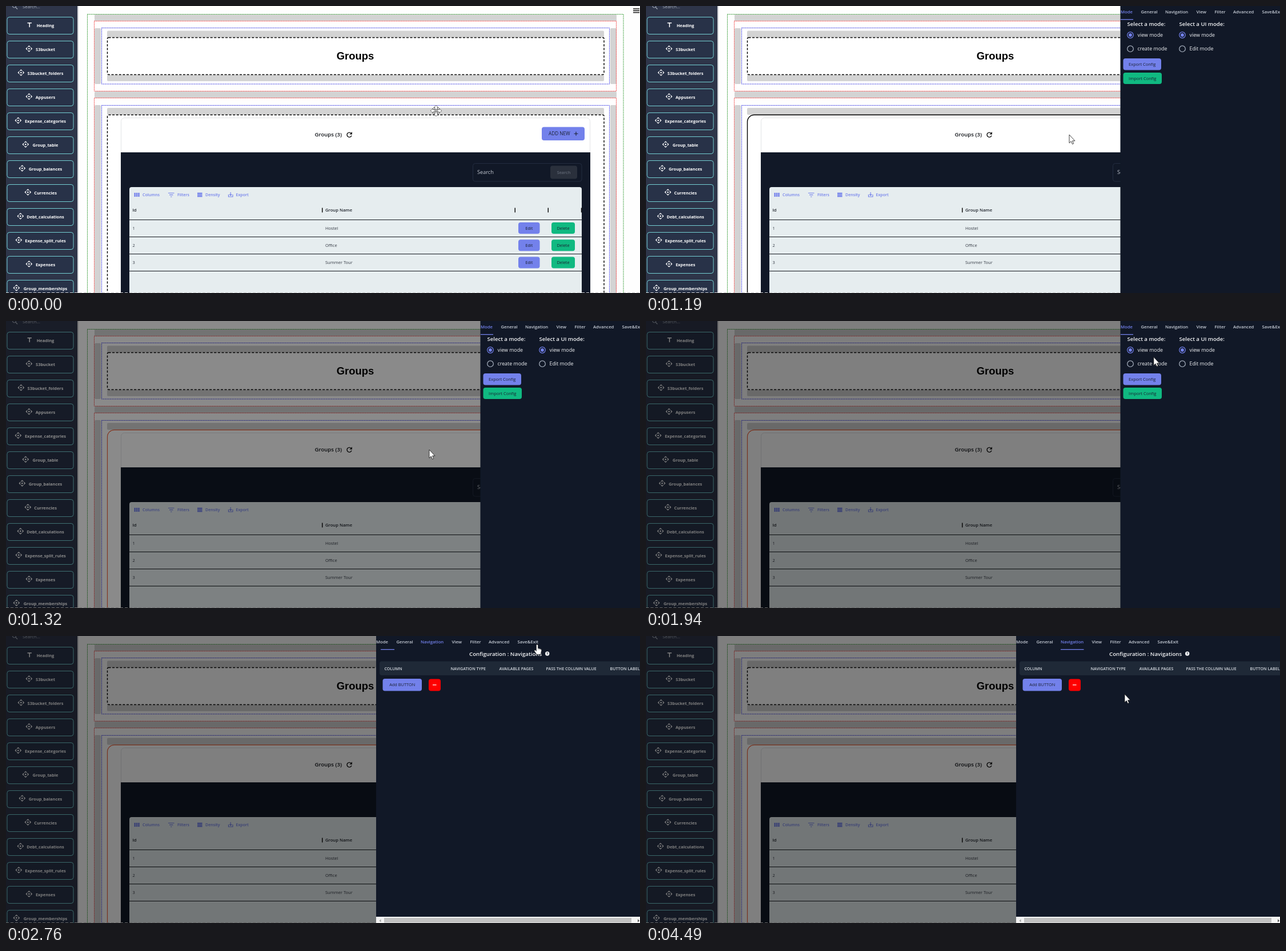
Animation, 1110 px wide and 504 px high, one loop 4.82 s. Source, as an HTML page:

```html
<!DOCTYPE html>
<html lang="en">
<head>
<meta charset="utf-8">
<title>Page builder</title>
<style>
  html, body { margin: 0; width: 100%; height: 100%; overflow: hidden; background: #fff; }
  svg { display: block; width: 1110px; height: 504px; }
  text { font-family: "Open Sans", "Noto Sans", sans-serif; white-space: pre; }
</style>
</head>
<body>
<svg id="stage" viewBox="0 0 1110 504" xmlns="http://www.w3.org/2000/svg"></svg>
<script>
const LOOP = 4820;
const INDIGO = '#7381eb', GREEN = '#10b981', NAVY = '#111827', GREY = '#d3d3d3';
const DOTS = '2 1', DASHES = '4 2.6';

// Drawing helpers
const box = (x, y, w, h, fill, r = 0, extra = '') =>
  `<rect x="${x}" y="${y}" width="${w}" height="${h}" rx="${r}" fill="${fill}" ${extra}/>`;
const outline = (x, y, w, h, color, dash = 'none', r = 0) =>
  box(x, y, w, h, 'none', r, `stroke="${color}" stroke-dasharray="${dash}"`);
const path = (d, color, width = 1, extra = '') =>
  `<path d="${d}" fill="none" stroke="${color}" stroke-width="${width}" ${extra}/>`;
const esc = s => s.replace('&', '&amp;');
const label = (x, cy, s, size, color, weight = 400, anchor = 'start') =>
  `<text x="${x}" y="${(cy + size * .36).toFixed(2)}" font-size="${size}" fill="${color}"
    font-weight="${weight}" text-anchor="${anchor}">${esc(s)}</text>`;
const button = (x, y, w, h, s, size, fill, color = '#1b2233', weight = 400) =>
  box(x, y, w, h, fill, 4) + label(x + w / 2, y + h / 2, s, size, color, weight, 'middle');
const group = (id, body, extra = '') => `<g id="${id}" ${extra}>${body}</g>`;
const four = d => [0, 90, 180, 270].map(a => `<path d="${d}" transform="rotate(${a})"/>`).join('');

function sidebar() {
  const items = [
    ['Heading', 41], ['S3bucket', 40], ['S3bucket_folders', 26], ['Appusers', 40],
    ['Expense_categories', 21], ['Group_table', 34], ['Group_balances', 28], ['Currencies', 38],
    ['Debt_calculations', 25], ['Expense_split_rules', 22], ['Expenses', 40], ['Group_memberships', 18]
  ];
  const rows = items.map(([name, ix], i) => {
    const y = 34 + i * 42;
    const icon = i
      ? `<g transform="translate(${ix + .3} ${y - 1})" fill="none" stroke="#fff" stroke-width="1.2">
          ${four('M-2-3L0-5L2-3')}<circle r="1.3" fill="#fff" stroke="none"/></g>`
      : path(`M37.5 ${y - 4.2}h7.4M41.2 ${y - 4.2}v7.4`, '#fff', 1.5);
    return box(2, y - 14.5, 116, 30, '#283248', 4, 'stroke="#74cfd3"') + icon +
      label(69, y, name, 7.45, '#fff', 700, 'middle');
  });
  return box(0, 0, 125, 504, '#2e3549') + box(125, 0, 2, 504, '#d0d2d6') +
    `<circle cx="14.5" cy="0" r="3" fill="none" stroke="#aab1bd"/>` + path('M16.7 2.2L20 5.5', '#aab1bd', 1.2) +
    label(29, 1, 'Search...', 7.8, '#aab1bd') + rows.join('');
}

function frames() {
  const red = '#f24848', blue = '#4545e4';
  const side = (y, h) => box(155, y, 11, h, GREY, 2) + box(1058, y, 11, h, GREY, 2);
  const bar = (y, h) => box(177, y, 870, h, GREY, 2);
  return outline(142.5, 14.5, 938.5, 520, '#3a9d3a', DOTS) +
    box(155, 15, 914, 11, GREY) + box(155, 150, 914, 11.5, GREY, 2) +
    side(39, 98) + side(174, 340) +
    outline(154.5, 26.5, 914, 123, red, DOTS) +
    outline(154.5, 161.5, 914, 400, red, DOTS) +
    outline(167.5, 38.5, 889, 98.5, blue, DOTS) +
    outline(167.5, 174.5, 889, 400, blue, DOTS) +
    bar(43.5, 12) + bar(121, 11) + bar(179, 12) +
    box(177.5, 55.5, 869.5, 65, '#fff', 2, `stroke="#000" stroke-width="1.4" stroke-dasharray="${DASHES}"`) +
    `<text x="611.5" y="93.5" font-size="18.4" font-weight="700" text-anchor="middle"
      style="font-family:'Liberation Sans',Arial,sans-serif">Groups</text>` +
    `<rect id="active" x="177.5" y="191.3" width="869.5" height="400" fill="#fff"/>`;
}

function tools() {
  const bars = [0, 3.4, 6.8];
  return bars.map(d => box(224.5 + d, 328, 2.4, 7, INDIGO)).join('') +
    path('M284 328.5h10.5M286 331.7h6.5M288 335h2.5', INDIGO, 1.2) +
    bars.map(d => box(335, 327.8 + d * .8, 8.6, 2.1, INDIGO)).join('') +
    path('M389.5 331v4h7.5v-4M393.2 327v5.5M391 330.6l2.2 2.2l2.2-2.2', INDIGO, 1.1) +
    [['Columns', 239], ['Filters', 300], ['Density', 349], ['Export', 402.5]]
      .map(([s, x]) => label(x, 331.5, s, 7.05, INDIGO, 600)).join('');
}

function card() {
  const rows = ['Hostel', 'Office', 'Summer Tour'].map((name, i) => {
    const y = 390 + i * 30.2;
    return label(221.5, y, String(i + 1), 7.5, '#353b45') + label(559, y, name, 7.5, '#353b45') +
      button(897, y - 10, 37.5, 20, 'Edit', 7.45, INDIGO) +
      button(955, y - 10, 41, 20, 'Delete', 7.35, GREEN);
  });
  const lines = [0, 1, 2, 3].map(i => box(216, 375 + i * 30, 792, 1, '#15191f')).join('');
  const seps = [553, 890.5, 948.5, 1006.8].map(x => box(x, 354.5, 1.5, 8, '#111')).join('');
  return box(201.5, 196.5, 821, 330, '#fff', 6, 'stroke="#e3e4e6"') +
    box(201, 257, 822, 247, NAVY) +
    label(540.5, 225.5, 'Groups (3)', 9.6, '#14171c', 600) +
    path('M604.3 223.6A4.1 4.1 0 1 0 605 227.6', '#111', 1.4) +
    '<path d="M606 221v4.6h-4.6z" fill="#111"/>' +
    box(938, 212.5, 75, 23.5, INDIGO, 4) + label(950, 224.3, 'ADD NEW', 8.2, '#1b2233', 500) +
    path('M994.5 224.3h7M998 220.8v7', '#1b2233', 1.1) +
    outline(817.5, 276.5, 190.5, 31.5, '#232c3f', 'none', 4) +
    label(825, 292, 'Search', 9.2, '#c4c9d2') +
    button(953, 280.5, 47, 23, 'Search', 7.3, '#2a303c', '#616875', 600) +
    box(216, 318, 792, 200, '#e6edef', 4) + tools() +
    label(221.5, 358.5, 'Id', 7.6, '#20252d', 600) +
    label(559, 358.5, 'Group Name', 7.65, '#20252d', 600) +
    seps + lines + rows.join('');
}

const TABS = [['Mode', 0], ['General', 35.5], ['Navigation', 78], ['View', 132.5],
  ['Filter', 164.5], ['Advanced', 197], ['Save&Exit', 247.5]];
const tabs = (x, current) => TABS.map(([s, dx]) =>
  label(x + dx, 10.5, s, 7.7, s === current ? INDIGO : '#c6ccd6', 600)).join('');

function modePanel() {
  const radio = (x, y, s, on) =>
    `<circle cx="${x}" cy="${y}" r="5.3" fill="none" stroke="${on ? INDIGO : '#a9b2c0'}" stroke-width="1.2"/>` +
    (on ? `<circle cx="${x}" cy="${y}" r="2.9" fill="${INDIGO}"/>` : '') +
    label(x + 12.5, y, s, 8.85, '#f1f3f6');
  return box(830.5, 0, 279.5, 504, NAVY) + tabs(831, 'Mode') + box(831, 23, 22, 1.3, INDIGO) +
    label(842.5, 32, 'Select a mode:', 9.55, '#f5f6f8', 600) +
    label(933.5, 32, 'Select a UI mode:', 9.55, '#f5f6f8', 600) +
    radio(848, 51, 'view mode', true) + radio(848, 75.2, 'create mode', false) +
    radio(939, 51, 'view mode', true) + radio(939, 75.2, 'Edit mode', false) +
    button(835.5, 92, 66.5, 20.5, 'Export Config', 7.5, INDIGO) +
    button(835.5, 117, 67.5, 20, 'Import Config', 7.5, GREEN);
}

function navPanel() {
  const heads = [['COLUMN', 662.5], ['NAVIGATION TYPE', 778.5], ['AVAILABLE PAGES', 863.5],
    ['PASS THE COLUMN VALUE', 945.5], ['BUTTON LABEL', 1057.5]];
  return box(648, 0, 462, 504, NAVY) + tabs(648, 'Navigation') +
    `<rect id="underline" y="23" height="1.3" fill="${INDIGO}"/>` +
    label(811, 32, 'Configuration : Navigations', 9.7, '#f5f6f8', 600) +
    '<circle cx="947.7" cy="31" r="3.7" fill="#f5f6f8"/>' + label(947.7, 31, '?', 6, NAVY, 700, 'middle') +
    box(654, 44.5, 470, 24.5, '#1f2937', 4) +
    heads.map(([s, x]) => label(x, 57, s, 7.1, '#d5dae1', 600)).join('') +
    button(659.5, 75, 68.5, 21.5, 'Add BUTTON', 7.35, INDIGO) +
    box(740, 75.5, 21, 21, '#fe0000', 4) + box(747, 85.3, 6.5, 1.2, '#fff') +
    box(648, 493, 462, 11, '#f3f3f3') + box(662, 495, 433, 8.5, '#c1c1c1') +
    '<path d="M653.5 500l3-2.8v5.6z" fill="#a3a3a3"/><path d="M1109 500l-3-2.8v5.6z" fill="#505050"/>';
}

const cursors =
  '<circle id="click" r="10.8" fill="#f5ec00"/>' +
  group('move', four('M0-9.7L4.2-5.5H1.9V-1.9H-1.9V-5.5H-4.2Z'), 'stroke-width=".75"') +
  group('arrow', '<path d="M0 0V14.6L3.3 11.6L5.5 16.6L7.7 15.6L5.6 10.8H10Z"/>',
    'fill="#fff" stroke="#111" stroke-width=".8"') +
  group('hand', '<path d="M-1.5 1.2C-1.5-.4 1.4-.4 1.4 1.2V6.6L6 7.8Q7.9 8.4 7.6 10.5L6.6 14.6L6 17.3H-.8L-5 11.3Q-5.3 9.3-3.2 9.8L-1.5 11.4Z"/>' +
    path('M1.4 6.6V9.5M3.7 7.4V9.7M5.8 8V10', '#777', .6), 'fill="#fff" stroke="#222" stroke-width=".6"');

document.getElementById('stage').innerHTML =
  box(0, 0, 1110, 504, '#fefefe') + frames() + card() +
  path('M1098 5h11M1098 8.2h11M1098 11.4h11', '#111', 1.5) + sidebar() +
  path('M0 503.5H1110', '#c9c9c9', 1, 'stroke-dasharray="5 3"') +
  box(0, 0, 1110, 504, '#000', 0, 'id="dim"') +
  group('mode', modePanel()) + group('nav', navPanel()) + group('cursor', cursors);

const el = {};
for (const id of ['active', 'dim', 'mode', 'nav', 'underline', 'cursor', 'click', 'move', 'arrow', 'hand'])
  el[id] = document.getElementById(id);
const set = (node, attrs) => { for (const k in attrs) node.setAttribute(k, attrs[k]); };
const show = (node, on) => node.setAttribute('display', on ? 'inline' : 'none');

// Stepped progress: n even steps, the first at time a, the last at time b
const stepped = (t, a, b, n) =>
  t < a ? 0 : Math.min(n, Math.floor((t - a) / (b - a) * (n - 1) + 1e-6) + 1) / n;
const linear = p => p, easeOut = p => p * (2 - p), smooth = p => p * p * (3 - 2 * p);

// Pointer legs: from, to, steps, x, y, easing
const LEGS = [
  [100, 520, 7, 741, 226, smooth],
  [1390, 2360, 15, 930, 18, easeOut],
  [2490, 2620, 2, 930, 15, linear],
  [3250, 3380, 3, 930, 22, linear],
  [3450, 3720, 5, 920, 29, linear],
  [3790, 4280, 8, 868, 66, linear],
  [4350, 4490, 3, 838, 102, linear]
];
function pointer(t) {
  let x = 753, y = 184;
  for (const [a, b, n, tx, ty, ease] of LEGS) {
    const p = ease(stepped(t, a, b, n));
    x += (tx - x) * p;
    y += (ty - y) * p;
  }
  return [x, y];
}

function draw(t) {
  const [x, y] = pointer(t);
  const opened = t >= 1190, wide = t >= 2760, chosen = t >= 1260;
  const press = t >= 850 && t < 990, tap = t >= 2490 && t < 2760;
  const hand = t > 1390 && y < 24;

  set(el.active, {
    rx: 2 + 10 * stepped(t, 100, 520, 7),
    stroke: chosen ? '#f0643c' : '#000',
    'stroke-width': chosen ? 1.2 : 1.4,
    'stroke-dasharray': t < 990 ? DASHES : 'none'
  });
  set(el.dim, { opacity: t < 1260 ? 0 : t < 1320 ? .28 : t < 1390 ? .46 : .5 });
  show(el.mode, opened && !wide);
  show(el.nav, wide);
  const p = smooth(stepped(t, 2760, 3030, 5));
  set(el.underline, { x: 648 + 78 * p, width: 22 + 18.5 * p });

  set(el.cursor, { transform: `translate(${x} ${y})` });
  show(el.click, press || tap);
  set(el.click, { opacity: press ? .78 : .64 });
  show(el.move, !opened);
  set(el.move, { fill: press ? 'none' : '#fff', stroke: press ? '#77770a' : '#333' });
  show(el.arrow, opened && !hand);
  show(el.hand, hand);
}

const start = performance.now();
function tick() {
  draw((performance.now() - start) % LOOP);
  requestAnimationFrame(tick);
}
tick();
</script>
</body>
</html>
```
